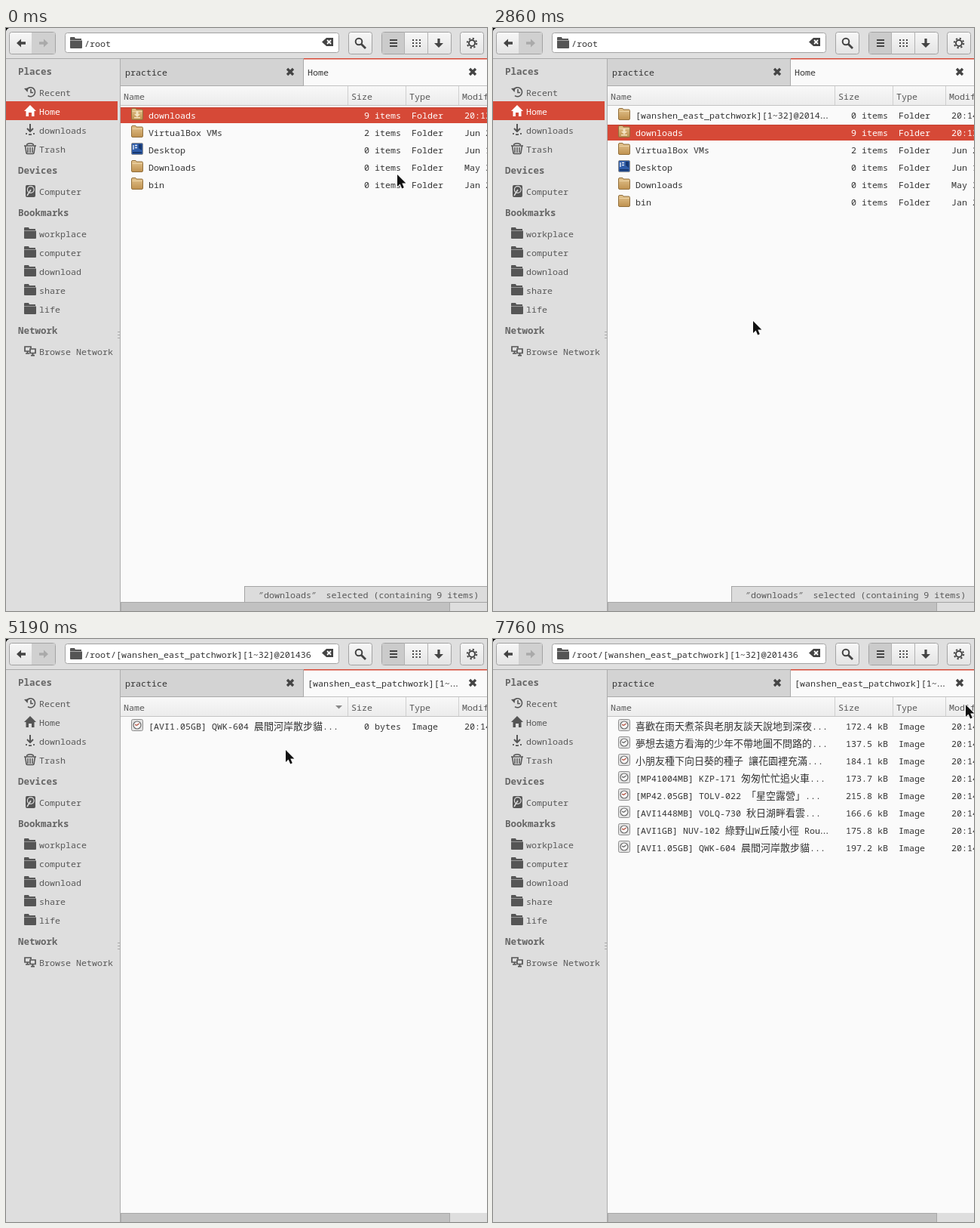
Recreate the animation shown at these times as an HTML page. Size 638 by 772 pixels, loop 8000 ms.

```html
<!DOCTYPE html>
<html lang="en">
<head>
<meta charset="utf-8">
<title>File manager</title>
<style>
  html, body { margin: 0; width: 100%; height: 100%; overflow: hidden; background: #dfdfdf; }
  svg { display: block; width: 638px; height: 772px; }
  text { font: 11.667px "Noto Sans Mono", "DejaVu Sans Mono", monospace; fill: #333; white-space: pre; }
  .cjk { font: 13px "Noto Sans CJK TC", "Noto Sans CJK", sans-serif; }
  .dots { letter-spacing: -3.33px; }
  .side { fill: #585858; }
  .head { font-size: 12.5px; font-weight: bold; fill: #666; }
  .white { fill: #fff; }
</style>
</head>
<body>
<svg viewBox="0 0 638 772">
  <defs>
    <linearGradient id="button" x2="0" y2="1"><stop stop-color="#f7f7f7"/><stop offset="1" stop-color="#e4e4e4"/></linearGradient>
    <linearGradient id="header" x2="0" y2="1"><stop stop-color="#f8f8f8"/><stop offset="1" stop-color="#ececec"/></linearGradient>
    <linearGradient id="tan" x2="0" y2="1"><stop stop-color="#e3c48e"/><stop offset="1" stop-color="#bf914f"/></linearGradient>
    <clipPath id="pane"><path d="M152 41H638V772H152Z"/></clipPath>
  </defs>
  <g id="chrome"></g>
  <g id="view"></g>
  <path id="cursor" d="M0 0V16L3.6 12.6L6.2 18.4L8.8 17.2L6.3 11.6H11.4Z" fill="#111"
    stroke="#fff" stroke-width="1.4" paint-order="stroke"/>
</svg>
<script>
const LOOP = 8000, RED = '#d64937', DARK = '#555';
const FOLDER = '[wanshen_east_patchwork]';
const $ = id => document.getElementById(id);

// ---- drawing helpers ----
const text = (x, y, s, attrs = '') => `<text x="${x}" y="${y}" ${attrs}>${s
  .replace(/[\u3000-\u9fff]+/g, '<tspan class="cjk">$&</tspan>')
  .replace('…', '<tspan class="dots" dx="-1.6">...</tspan>')}</text>`;
const rect = (x, y, w, h, fill, attrs = '') =>
  `<rect x="${x}" y="${y}" width="${w}" height="${h}" fill="${fill}" ${attrs}/>`;
const box = (x, y, w, h, fill, r = 3) =>
  rect(x + .5, y + .5, w - 1, h - 1, fill, `rx="${r}" stroke="#a3a3a3"`);
const fill = (d, color = DARK) => `<path d="${d}" fill="${color}"/>`;
const line = (d, color = DARK, width = 1.6, attrs = '') =>
  `<path d="${d}" fill="none" stroke="${color}" stroke-width="${width}" ${attrs}/>`;
const at = (x, y, s) => `<g transform="translate(${x} ${y})">${s}</g>`;

// ---- icons, centred on the origin ----
const darkFolder = fill('M-8-7Q-8-8-7-8H-2L-1-6H7V-4H-8ZM-8-3.4H8V6Q8 7 7 7H-7Q-8 7-8 6Z');
const cross = line('M-4-4L4 4M4-4L-4 4', '#444', 3.3);
const house = color => fill('M0-8L8 0H5.5V7H2V2H-2V7H-5.5V0H-8Z', color);
const sideIcons = {
  recent: line('M-4.5-3.5A6 6 0 1 1-3 4.6M1-4V.5H4') + fill('M-8-5L-2.5-5.5L-3.5 0Z'),
  home: house('#fff'),
  homeDark: house(DARK),
  down: line('M0-8V1M-4-2L0 2L4-2', DARK, 2) + line('M-5 4V6M-2 6.2H2M5 4V6', DARK, 1.8),
  trash: line('M-8-4H8M-4.5-5Q-4-7.2 0-7.2T4.5-5M-6.5-4L-5 5.5Q-4.7 6.5-3.5 6.5H3.5Q4.7 6.5 5 5.5L6.5-4') +
    line('M-3-2V5M0-2V5M3-2V5', DARK, 1.5),
  disk: rect(-6, -8, 13, 16, DARK, 'rx="2"') +
    '<circle cx=".8" cy="-2" r="4.4" fill="none" stroke="#ddd" stroke-width="1.2"/>' + line('M-4 6L1-2', '#ddd', 1.5),
  folder: darkFolder,
  net: line('M-7-6H1V0H-7ZM-6 3H-1M-3.5 0V3', DARK, 1.7) + rect(-1, -4, 9, 8, '#dfdfdf') +
    line('M0-3H7V2.5H0ZM1 5.6H6M3.5 3V5', DARK, 1.7)
};
const tanFolder = `<path d="M-7.5-6Q-7.5-7.5-6-7.5H-2L-1-6H6Q7.5-6 7.5-4.5V6Q7.5 7.5 6 7.5H-6Q-7.5 7.5-7.5 6Z"
  fill="url(#tan)" stroke="#93703d"/>` + line('M-6.5-3.5H6.5', '#ecd3a5', 1);
const clock = hand => rect(-7.5, -7.5, 15, 15, '#e4e4e4', 'rx="2" stroke="#8d8d8d"') +
  '<circle r="5" fill="#f6f6f6" stroke="#6a6a6a" stroke-width="1.2"/>' + line('M2.5-2L-.5 .3L-3-.6', hand, 1.2);
const rowIcons = {
  folder: tanFolder,
  down: tanFolder + fill('M-1.5-4H1.5V0H4L0 4L-4 0H-1.5ZM-4 4H4V5.5H-4Z', '#f3e2c0'),
  desktop: rect(-7.5, -7.5, 15, 15, '#2f5da9', 'rx="1.5" stroke="#8c8c8c"') +
    line('M-5-5V1M-3-4.5H0M-3-1.5H0', '#e5edf8', 1.4) + fill('M2-6H6V2L2-1ZM-6 4H6V6H-6Z', '#17386f'),
  red: clock('#b5503f'),
  grey: clock('#666')
};

// ---- fixed window parts ----
const toolbar = () => rect(0, 0, 638, 40, '#dfdfdf') + fill('M0 0H4Q1 1 0 4Z', '#000') +
  box(4, 5, 62, 30, 'url(#button)') + rect(34, 6, 31, 28, '#d0d0d0') +
  fill('M14 20L20 14.5V18.3H26V21.7H20V25.5Z', '#444') + fill('M56 20L50 14.5V18.3H44V21.7H50V25.5Z', '#aaa') +
  box(78, 6, 364, 27, '#fff') + at(93, 20, darkFolder) +
  fill('M419 18.5L425 13H434V24H425Z', '#444') + line('M426 16L431 21M431 16L426 21', '#fff', 1.8) +
  box(454, 5, 32, 30, 'url(#button)') +
  '<circle cx="468" cy="18" r="4.3" fill="none" stroke="#444" stroke-width="2"/>' + line('M471 21L477 27', '#444', 2.8) +
  box(498, 5, 93, 30, 'url(#button)') + rect(499, 6, 29, 28, '#cbcbcb') +
  line('M528.5 5V35M559.5 5V35', '#b2b2b2', 1) +
  line('M509 16H519M509 20H519M509 24H519', '#444', 2) +
  line('M539 16H550M539 20H550M539 24H550', '#444', 2, 'stroke-dasharray="2 2.5"') +
  fill('M572.4 14H575.6V20H580L574 26L568 20H572.4Z', '#444') +
  box(602, 5, 32, 30, 'url(#button)') +
  '<g fill="none" stroke="#444"><circle cx="618" cy="20" r="4" stroke-width="2"/>' +
  '<circle cx="618" cy="20" r="6.2" stroke-width="2" stroke-dasharray="2.2 2.67"/></g>' +
  rect(0, 40, 638, 1, '#a9a9a9');

const places = [
  [86, 'recent', 'Recent'], [136, 'down', 'downloads'], [161, 'trash', 'Trash'], [217, 'disk', 'Computer'],
  ...['workplace', 'computer', 'download', 'share', 'life'].map((s, i) => [273 + i * 25, 'folder', s]),
  [429, 'net', 'Browse Network']
];
const place = (y, icon, label, cls = 'side') =>
  at(32, y - 1, sideIcons[icon]) + text(44, y + 4, label, `class="${cls}"`);

const sidebar = () => rect(0, 41, 151, 731, '#dedede') + rect(151, 41, 1, 731, '#adadad') +
  [[58, 'Places'], [189, 'Devices'], [245, 'Bookmarks'], [401, 'Network']]
    .map(([y, s]) => text(16, y + 4, s, 'class="head"')).join('') +
  places.map(p => place(...p)).join('') +
  line('M148 402.5H151M148 406.5H151M148 410.5H151', '#aaa', 1);

const scrollThumb = rect(152.5, 760.5, 436, 12, '#c1c1c1', 'stroke="#a8a8a8"');
const pane = () => rect(152, 41, 486, 719, '#fafafa') +
  rect(152, 41, 242, 35, '#d3d3d3') + rect(394, 41, 1, 35, '#a9a9a9') + rect(152, 76, 486, 1, '#c2c2c2') +
  rect(152, 76, 243, 1, '#a9a9a9') +
  text(158, 63, 'practice') + at(377, 58, cross) + at(619, 58, cross) +
  rect(152, 77, 486, 25, 'url(#header)') + rect(152, 102, 486, 1, '#c4c4c4') +
  rect(152, 760, 486, 12, '#dedede') + scrollThumb;

// ---- list contents ----
const home = [
  ['down', 'downloads', '9 items', 'Folder', '20:13'],
  ['folder', 'VirtualBox VMs', '2 items', 'Folder', 'Jun 2'],
  ['desktop', 'Desktop', '0 items', 'Folder', 'Jun 1'],
  ['folder', 'Downloads', '0 items', 'Folder', 'May 3'],
  ['folder', 'bin', '0 items', 'Folder', 'Jan 2']
];
const homeWithNew = [['folder', FOLDER + '[1~32]@2014…', '0 items', 'Folder', '20:14'], ...home];
const titles = {
  A: '[AVI1.05GB] QWK-604 晨間河岸散步貓',
  B: '[AVI1GB] NUV-102 綠野山W丘陵小徑 Rou…',
  C: '[AVI1448MB] VOLQ-730 秋日湖畔看雲',
  D: '[MP42.05GB] TOLV-022 「星空露營」',
  E: '[MP41004MB] KZP-171 匆匆忙忙追火車',
  F: '小朋友種下向日葵的種子 讓花園裡充滿',
  G: '喜歡在雨天煮茶與老朋友談天說地到深夜',
  H: '夢想去遠方看海的少年不帶地圖不問路的'
};
// "D8.2" is title D with 8.2 kB
const files = list => list.split(' ').map((item, i) => {
  const title = titles[item[0]], size = item.slice(1);
  return [i % 2 ? 'grey' : 'red', title.endsWith('…') ? title : title + '...',
    size === '0' ? '0 bytes' : size + ' kB', 'Image', '20:14'];
});

const inFolder = { inside: true, arrow: true };
const empty = { ...inFolder, rows: [], focus: true };
const scenes = [
  [0, { rows: home, selected: 0, status: 'home' }],
  [1980, { rows: homeWithNew, selected: 1, status: 'home' }],
  [4140, { rows: homeWithNew, selected: 0, status: 'home' }],
  [4390, { ...empty, status: 'folder' }],
  [4480, empty],
  [5110, { ...inFolder, rows: files('A0') }],
  [5310, { ...inFolder, rows: files('A0 E0 F0') }],
  [5510, { ...inFolder, rows: files('A0 D8.2 E0 F16.4') }],
  [6670, { ...inFolder, rows: files('A0 C32.8 D8.2 E0 F16.4 G16.4') }],
  [6790, { ...inFolder, rows: files('A0 B114.7 C65.5 D8.2 E0 F16.4 G49.2 H65.5') }],
  [7050, { inside: true, rows: files('H137.5 G172.4 E0 D8.2 F16.4 C65.5 A0 B114.7') }],
  [7190, { inside: true, rows: files('H137.5 G172.4 F184.1 D98.3 E81.9 C166.6 B175.8 A197.2') }],
  [7720, { inside: true, rows: files('G172.4 H137.5 F184.1 E173.7 D215.8 C166.6 B175.8 A197.2') }]
];

function row([icon, name, size, type, date], i, selected) {
  const y = 116 + i * 23, cls = selected ? 'class="white"' : '';
  return (selected ? rect(152, y - 11, 486, 21, RED) + rect(152, y - 11, 486, 1, '#c33f2f') : '') +
    at(174, y - 2, rowIcons[icon]) + text(189, y + 4, name, cls) +
    text(524, y + 4, size, cls + ' text-anchor="end"') + text(538, y + 4, type, cls) + text(608, y + 4, date, cls);
}

function status(kind) {
  const [left, width, nameX, name, endX, count] = kind === 'home'
    ? [316, 330, 342, 'downloads', 405, 9]
    : [145, 461, 148, FOLDER.slice(0, 20) + '…32]@201436', 369, 0];
  return box(left, 739, width, 22, '#dcdcdc', 0) +
    (kind === 'home' ? text(335, 755, '″', 'class="side"') : '') +
    text(nameX, 755, name, 'class="side"') + text(endX, 755, '″', 'class="side"') +
    text(endX + 19.5, 755, `selected (containing ${count} items)`, 'class="side"');
}

function view(s) {
  return (s.inside ? place(111, 'homeDark', 'Home')
      : rect(0, 97, 148, 25, RED) + place(111, 'home', 'Home', 'white')) +
    text(104, 25, s.inside ? `/root/${FOLDER}[1~32]@201436` : '/root') +
    text(400, 63, s.inside ? FOLDER + '[1~…' : 'Home') +
    line('M453.5 77V102M530.5 77V102M600.5 77V102', '#cfcfcf', 1) +
    [[156, 'Name'], [458, 'Size'], [535, 'Type'], [605, 'Modified']]
      .map(([x, label]) => text(x, 95, label, 'class="side"')).join('') +
    (s.arrow ? fill('M437 88H446L441.5 92.5Z', '#888') : '') +
    (s.focus ? rect(153.5, 104.5, 486, 654, 'none', 'stroke="#222" stroke-dasharray="1 1"') : '') +
    s.rows.map((r, i) => row(r, i, i === s.selected)).join('') +
    (s.status ? `<g clip-path="url(#pane)">${status(s.status)}</g>` + scrollThumb : '');
}

// ---- pointer path: time, x, y ----
const path = [
  [0, 519, 194], [40, 519, 194], [80, 520, 194], [200, 520, 194], [230, 521, 194], [1540, 521, 194],
  [2360, 335, 356], [2400, 335, 357], [2600, 343, 390], [2820, 343, 390], [2860, 345, 388],
  [3300, 354, 133], [3440, 354, 133], [3640, 349, 122], [3820, 354, 113], [4990, 354, 113],
  [5690, 437, 282], [6170, 437, 282], [6510, 627, 83], [6630, 627, 83], [6800, 627, 87], [8000, 627, 87]
];
function pointer(t) {
  const i = path.findIndex(p => p[0] > t), [t0, x0, y0] = path[i - 1], [t1, x1, y1] = path[i];
  const u = (t - t0) / (t1 - t0), k = u * u * (3 - 2 * u);
  return [x0 + (x1 - x0) * k, y0 + (y1 - y0) * k].map(Math.round);
}

$('chrome').innerHTML = sidebar() + pane() + toolbar() + rect(395, 40, 243, 1.5, RED);
let shown;
function draw() {
  const t = performance.now() % LOOP;
  const scene = scenes.findLast(s => s[0] <= t)[1];
  if (scene !== shown) $('view').innerHTML = view(shown = scene);
  $('cursor').setAttribute('transform', `translate(${pointer(t)})`);
  requestAnimationFrame(draw);
}
draw();
</script>
</body>
</html>
```
